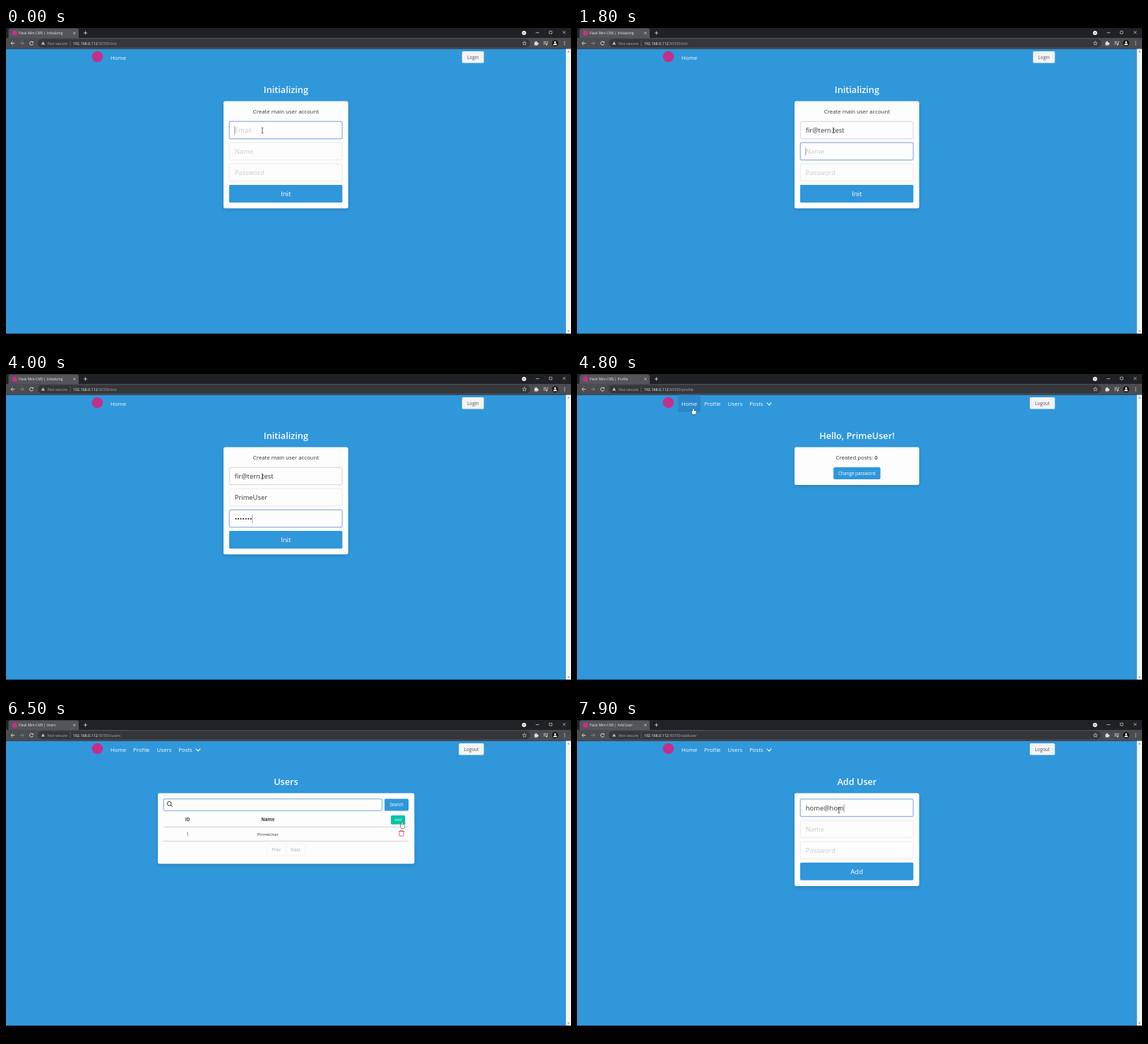
Recreate the animation shown at these times as an HTML page with a canvas. Size 800 px wide and 450 px high, loop 8 s.

```html
<!DOCTYPE html>
<html lang="en">
<head>
<meta charset="utf-8">
<title>Flask Mini-CMS</title>
<style>
html, body { margin: 0; width: 100%; height: 100%; overflow: hidden; background: #000; }
canvas { display: block; width: 800px; height: 450px; }
</style>
</head>
<body>
<canvas id="stage"></canvas>
<script>
const LOOP = 8000, STEP = 100, MID = 396.4;
const BLUE = '#3097db', PINK = '#c52f8c', INK = '#363636', CARD = '#fdfdfe';
const PALE = '#dcdde0', BAR = '#4b4c4f', PILL = '#35363a';
const EMAIL = 'fir@tern.test', USER = 'PrimeUser', SECOND = 'home@hom';
const canvas = document.getElementById('stage');
const c = canvas.getContext('2d');
const ratio = window.devicePixelRatio || 1;
canvas.width = 800 * ratio;
canvas.height = 450 * ratio;

const PAGES = {
  init: { from: 0, title: 'Initializing', path: '/init', draw: initPage },
  profile: { from: 4200, title: 'Profile', path: '/profile', draw: profilePage },
  dashboard: { from: 5000, title: 'Dashboard', path: '', draw: dashboardPage },
  users: { from: 6000, title: 'Users', path: '/users', draw: usersPage },
  add: { from: 6700, title: 'Add User', path: '/adduser', draw: addPage }
};
const MOVES = [
  { from: 4200, to: 4700, x: 164.8, y: 49 },
  { from: 5200, to: 5500, x: 225, y: 47.5 },
  { from: 6000, to: 6400, x: 560.8, y: 145 },
  { from: 6800, to: 7200, x: 371, y: 128 }
];

function box(x, y, w, h, fill, r = 0, stroke, lw = 0.5) {
  c.beginPath();
  c.roundRect(x, y, w, h, r);
  if (fill) { c.fillStyle = fill; c.fill(); }
  if (stroke) { c.strokeStyle = stroke; c.lineWidth = lw; c.stroke(); }
}

function disc(x, y, r, fill) {
  c.beginPath();
  c.arc(x, y, r, 0, 7);
  c.fillStyle = fill;
  c.fill();
}

function arc(x, y, r, color, lw, from = 0, to = 7) {
  c.beginPath();
  c.arc(x, y, r, from, to);
  c.strokeStyle = color;
  c.lineWidth = lw;
  c.stroke();
}

function line(color, lw, ...p) {
  c.beginPath();
  for (let i = 0; i < p.length; i += 2) c.lineTo(p[i], p[i + 1]);
  c.strokeStyle = color;
  c.lineWidth = lw;
  c.stroke();
}

function plus(x, y, r, color, lw) {
  line(color, lw, x - r, y, x + r, y);
  line(color, lw, x, y - r, x, y + r);
}

function cross(x, y, r) {
  line(PALE, 0.7, x - r, y - r, x + r, y + r);
  line(PALE, 0.7, x - r, y + r, x + r, y - r);
}

function triangle(x, y, r, fill, turn = 0) {
  c.beginPath();
  for (let i = 0; i < 3; i++) {
    const a = turn - Math.PI / 2 + i * Math.PI * 2 / 3;
    c.lineTo(x + r * Math.cos(a), y + r * Math.sin(a));
  }
  c.fillStyle = fill;
  c.fill();
}

// y is the middle of the capitals; returns the width
function text(s, x, y, size, color = INK, align = 'left', weight = 400) {
  c.font = `${weight} ${size}px "Open Sans", "Noto Sans", sans-serif`;
  c.textAlign = align;
  c.fillStyle = color;
  c.fillText(s, x, y + size * 0.36);
  return c.measureText(s).width;
}

function card(x, y, w, h, alpha = 0.14) {
  c.save();
  c.shadowColor = `rgba(10,10,10,${alpha})`;
  c.shadowBlur = 5 * ratio;
  c.shadowOffsetY = 2 * ratio;
  box(x, y, w, h, CARD, 2.5);
  c.restore();
}

const heading = (s, y = 87) => text(s, MID, y, 12.7, '#fafcff', 'center', 600);

function button(label, x, y, w, h, size, fill = BLUE, color = '#fff') {
  box(x, y, w, h, fill, 1.6);
  text(label, x + w / 2, y + h / 2, size, color, 'center');
}

function frame(x, y, w, h, focus, hover) {
  if (focus) box(x, y, w, h, null, 1.7, 'rgba(50,115,220,.2)', 1.5);
  box(x + 0.3, y + 0.3, w - 0.6, h - 0.6, CARD, 1.7,
    focus ? '#4a82c4' : hover ? '#b8babf' : '#dfdfe3', 0.6);
}

function form(y, rows, focus, mouse, action) {
  rows.forEach(([hint, value], i) => {
    const top = y + i * 30, mid = top + 13;
    frame(316, top, 160.3, 25, i === focus, mouse.y > top && mouse.y < top + 25 && mouse.x < 476);
    const w = text(value || hint, 323.8, mid, 9.4, value ? INK : '#cbcbd0');
    const x = value ? 324.2 + w : 323.8;
    if (i === focus) line('#444', 0.5, x, mid - 6, x, mid + 6);
  });
  button(action, 316, y + 90, 160.3, 25, 9.6);
}

function typed(s, from, to, t) {
  return t < from ? '' : s.slice(0, 1 + Math.floor((t - from) / (to - from) * (s.length - 1)));
}

function initPage(t, mouse) {
  heading('Initializing');
  card(308, 103.5, 176.5, 151.7);
  text('Create main user account', MID, 117.7, 7.8, INK, 'center');
  form(132, [
    ['Email', typed(EMAIL, 100, 1500, t)],
    ['Name', typed(USER, 2000, 3100, t)],
    ['Password', typed('••••••••', 3400, 4100, t)]
  ], t < 1700 ? 0 : t < 3300 ? 1 : 2, mouse, 'Init');
}

function profilePage() {
  heading('Hello, ' + USER + '!');
  card(308, 103.5, 176.5, 53.4);
  const w = text('Created posts: ', 366.5, 117.7, 7.85);
  text('0', 366.5 + w, 117.7, 7.85, INK, 'left', 600);
  button('Change password', 363.2, 132, 66.4, 17, 6.35);
}

function dashboardPage() {
  heading('Flask Mini-CMS', 82);
  text('Lorem ipsum dolor!', MID, 96.3, 7.85, '#f2f8fd', 'center');
  for (let i = 0; i < 3; i++) card(116.7 + i * 189.9, 110.5, 179.7, 62.8);
  text('Last posts', 177.8, 125, 9.65);
  plus(230.3, 125.2, 3.4, '#22b28d', 0.9);
  text('Last categories', 356.3, 125, 9.65);
  plus(431.7, 125.2, 3.4, '#33a2d8', 0.9);
  text('Statistic', 586.4, 125, 9.65, INK, 'center');
  card(314.7, 142, 163.3, 19.5, 0.1);
  text('Uncategorized', 321.3, 152, 6.35, INK, 'left', 700);
  box(463.4, 146.8, 5.8, 7.9, null, [0.8, 2.5, 0.8, 0.8], '#2c62a8', 0.9);
  plus(466.3, 151.3, 1.5, '#2c62a8', 0.8);
  card(504.5, 140.3, 163.3, 19.5, 0.1);
  text('Created categories', 511.4, 150.4, 6.25, INK, 'left', 700);
  text('1', 661.3, 150.4, 6.2, INK, 'right');
}

function usersPage() {
  const red = '#db4560';
  heading('Users');
  card(215, 103.5, 363.3, 100);
  frame(223, 111.5, 309.6, 17, true);
  arc(231.2, 118.3, 2.9, '#222', 0.9);
  line('#222', 0.9, 233.2, 120.4, 235.6, 122.8);
  button('Search', 536, 111.5, 34, 17, 6.25);
  text('ID', 257, 140.5, 6.3, INK, 'center', 700);
  text('Name', 370.8, 140.5, 6.2, INK, 'center', 700);
  button('Add', 545, 135, 20.2, 12.8, 5.1, '#08c2a5', '#e5fbf6');
  for (const y of [151.4, 171.4]) line('#b4b4b8', 0.6, 223, y, 570, y);
  text('1', 257, 161.5, 6.2, INK, 'center');
  text(USER, 370.8, 161.5, 6.15, INK, 'center');
  line(red, 0.8, 555.8, 157.5, 564.2, 157.5);
  box(558.4, 156, 3.2, 1.5, null, 0.4, red, 0.7);
  box(557, 157.5, 6, 6.7, null, 0.8, red, 0.8);
  ['Prev', 'Next'].forEach((label, i) => {
    box(369.2 + i * 27.2, 175.3, 27.2, 16.2, CARD, 1.2, '#ececef');
    text(label, 382.6 + i * 27.2, 183.6, 6.25, '#adadb1', 'center');
  });
}

function addPage(t, mouse) {
  heading('Add User');
  card(308, 103.5, 176.5, 131.5);
  form(111.7, [['Email', typed(SECOND, 7300, 7900, t)], ['Name'], ['Password']], 0, mouse, 'Add');
}

function navBar(guest, mouse) {
  disc(129.4, 40.5, 7.8, PINK);
  let x = 148;
  for (const label of guest ? ['Home'] : ['Home', 'Profile', 'Users', 'Posts']) {
    c.font = '400 7.8px "Open Sans", "Noto Sans", sans-serif';
    const w = c.measureText(label).width + 10;
    if (mouse.y < 54 && mouse.x >= x - 5 && mouse.x < x - 5 + w) box(x - 5, 29.5, w, 24.5, '#2988c9');
    text(label, x, 42, 7.8, '#fff');
    x += w;
  }
  if (!guest) line('#fff', 1.1, 268.7, 40.6, 272, 44, 275.3, 40.6);
  const left = guest ? 645.7 : 641.2;
  button(guest ? 'Login' : 'Logout', left, 33, 676.6 - left, 16.5, 6.45, '#f4f4f6', '#55565a');
}

function tabStrip(title) {
  box(0, 0, 800, 15, '#202124');
  box(3.5, 0.5, 99.5, 14, '#545558', [3, 3, 0, 0]);
  disc(12, 7.2, 3.6, PINK);
  text('Flask Mini-CMS | ' + title, 18, 7.2, 4.9, '#e8e9eb');
  cross(96.8, 7.2, 1.7);
  plus(112.5, 7, 2.5, PALE, 0.8);
  disc(733.5, 7, 3, '#f0f0f0');
  triangle(733.5, 7, 1.1, '#202124', Math.PI);
  line(PALE, 0.7, 750, 6.6, 755, 6.6);
  box(769.2, 4.4, 3.8, 3.6, null, 0.3, PALE, 0.7);
  cross(790.3, 6.2, 2);
}

function arrow(x, dir, color) {
  line(color, 0.9, x + 2.8 * dir, 21.6, x - 2.5 * dir, 21.6);
  line(color, 0.9, x, 19, x - 2.6 * dir, 21.6, x, 24.2);
}

function toolBar(path) {
  box(0, 14, 800, 15.5, BAR);
  box(45, 15.6, 697, 12, PILL, 6);
  arrow(9.5, 1, PALE);
  arrow(22.5, -1, '#8b8c90');
  arc(36, 21.6, 2.5, PALE, 0.9, 0.3, 5.5);
  triangle(37.9, 20, 1.5, PALE, 0.8);
  triangle(52.5, 22.1, 3, '#b9babd');
  text('Not secure', 59, 21.7, 5.5, '#acadb0');
  line('#7a7b7e', 0.5, 91, 17.5, 91, 25.7);
  const w = text('192.168.0.112', 94.7, 21.7, 5.4, '#f2f3f5');
  text(':50550' + path, 94.7 + w, 21.7, 5.4, '#a8a9ad');

  c.beginPath();
  for (let i = 0; i < 10; i++) {
    const a = i * Math.PI / 5 - Math.PI / 2, r = i % 2 ? 1.3 : 3;
    c.lineTo(734 + r * Math.cos(a), 21.7 + r * Math.sin(a));
  }
  c.closePath();
  c.strokeStyle = PALE;
  c.lineWidth = 0.6;
  c.stroke();
  box(748.2, 20, 4.8, 4.6, PALE, 0.6);
  disc(750.5, 19.6, 1, PALE);
  disc(753.2, 22.2, 1, PALE);
  for (let i = 0; i < 3; i++) {
    line(PALE, 0.7, 761, 19.4 + i * 1.7, i < 2 ? 765 : 763.4, 19.4 + i * 1.7);
    disc(791, 19.5 + i * 2.1, 0.65, PALE);
  }
  disc(765.4, 23.3, 1.1, PALE);
  line(PALE, 0.7, 766.3, 23.3, 766.3, 19.3, 767.8, 19.3);
  disc(777.5, 21.6, 4.3, '#0d0d0e');
  disc(777.5, 20.2, 1.4, '#f3f3f3');
  box(774.9, 22.1, 5.2, 2.2, '#f3f3f3', [1.8, 1.8, 0.4, 0.4]);
}

function scrollBar() {
  box(792.8, 29.5, 7.2, 403, '#f5f5f6');
  triangle(796.5, 33.7, 1.7, '#909093');
  triangle(796.5, 428.8, 1.7, '#909093', Math.PI);
}

function mouseAt(t) {
  let x = 363, y = 145;
  for (const m of MOVES) {
    const u = Math.min(1, Math.max(0, (t - m.from) / (m.to - m.from)));
    const e = u * u * (3 - 2 * u);
    x += (m.x - x) * e;
    y += (m.y - y) * e;
  }
  return { x, y };
}

function beam(x, y) {
  line('#222', 0.7, x, y - 3.6, x, y + 3.6);
  for (const d of [-3.6, 3.6]) line('#222', 0.6, x - 1.4, y + d, x + 1.4, y + d);
}

function hand(x, y) {
  for (const stroke of ['#222', null]) {
    box(x - 0.7, y, 1.5, 5, '#fff', 0.7, stroke, 1);
    box(x - 2.2, y + 3, 6, 5, '#fff', [1, 1.2, 2, 2], stroke, 1);
  }
}

function pointer(x, y) {
  c.beginPath();
  c.moveTo(x, y);
  c.lineTo(x, y + 7.2);
  c.lineTo(x + 2.2, y + 5.6);
  c.lineTo(x + 5.1, y + 5.1);
  c.closePath();
  c.fillStyle = '#fff';
  c.fill();
  c.strokeStyle = '#222';
  c.lineWidth = 0.6;
  c.stroke();
}

function cursor(page, { x, y }) {
  const inside = (l, t, r, b) => x > l && x < r && y > t && y < b;
  const onField = page === PAGES.init && inside(316, 132, 476, 217)
    || page === PAGES.add && inside(316, 111, 476, 197)
    || page === PAGES.users && inside(223, 111, 532, 129);
  const onLink = inside(143, 29, 281, 54) || page === PAGES.users && inside(545, 135, 566, 148);
  (onField ? beam : onLink ? hand : pointer)(x, y);
}

function draw(t) {
  const page = Object.values(PAGES).filter(p => p.from <= t).pop();
  const mouse = mouseAt(t);
  c.setTransform(ratio, 0, 0, ratio, 0, 0);
  box(0, 0, 800, 450, '#000');
  box(0, 29.5, 793, 403, BLUE);
  tabStrip(page.title);
  toolBar(page.path);
  scrollBar();
  navBar(page === PAGES.init, mouse);
  page.draw(t, mouse);
  cursor(page, mouse);
}

const start = performance.now();
function tick() {
  const t = (performance.now() - start) % LOOP;
  draw(Math.floor(t / STEP) * STEP);
  requestAnimationFrame(tick);
}
tick();
</script>
</body>
</html>
```
